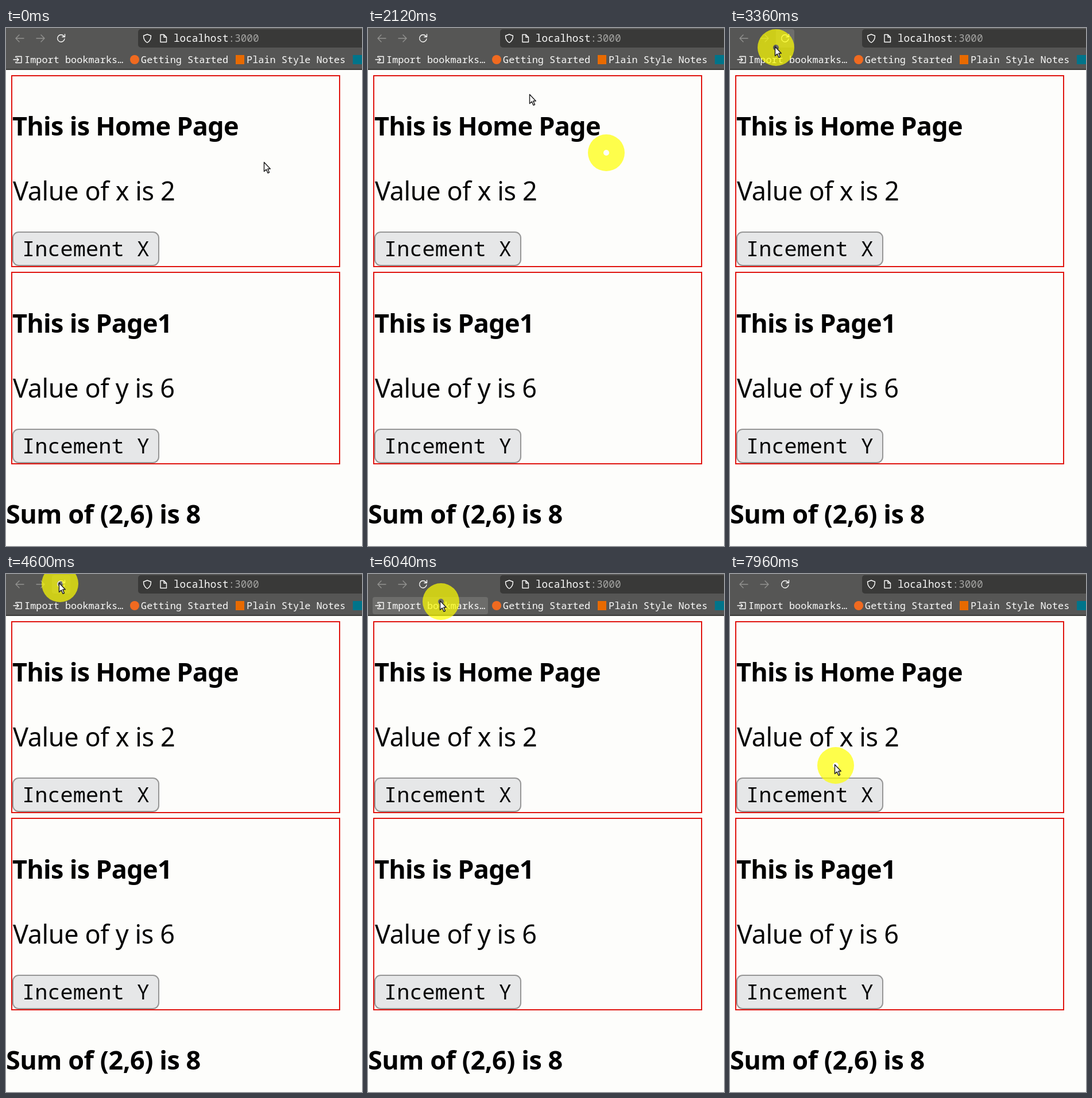
Animation, 620 px wide and 901 px high, one loop 8000 ms. Source, as an HTML page:

```html
<!DOCTYPE html>
<html lang="en">
<head>
<meta charset="utf-8">
<title>Counter page</title>
<style>
  html, body { margin: 0; width: 100%; height: 100%; overflow: hidden; background: #fdfdfb; }
  svg { display: block; width: 620px; height: 901px; }
  text { white-space: pre; }
  #page text { font: 45px "Noto Sans", "Open Sans", sans-serif; letter-spacing: -.4px; fill: #060606; }
  #page .head { font-weight: 700; letter-spacing: -.75px; fill: #000; }
  #page .sum { letter-spacing: -.5px; }
  #page .label { font: 37px "Noto Sans Mono", "DejaVu Sans Mono", monospace; letter-spacing: 0; }
  .box { fill: none; stroke: #e0140f; stroke-width: 2; }
  .button { fill: #e6e7e8; stroke: #969696; stroke-width: 2; }
  .bar { font: 500 16.9px "Noto Sans Mono", "DejaVu Sans Mono", monospace; fill: #fbfbfa; }
  .bar .url { font-size: 17.7px; }
  .icon { fill: none; stroke: #fbfbfa; stroke-width: 1.4; stroke-linejoin: round; stroke-linecap: round; }
  .dim { stroke: #929290; }
  .hover { fill: #6d6d6b; visibility: hidden; }
</style>
</head>
<body>
<svg viewBox="0 0 620 901">
  <rect width="620" height="901" fill="#fdfdfb"/>

  <g id="page">
    <rect class="box" x="10" y="83" width="571" height="332"/>
    <text class="head" x="11" y="187">This is Home Page</text>
    <text x="12" y="300">Value of x is 2</text>
    <rect class="button" x="12" y="355" width="254" height="58" rx="10"/>
    <text class="label" x="28" y="397">Incement X</text>

    <rect class="box" x="10" y="425" width="571" height="333"/>
    <text class="head" x="11" y="530">This is Page1</text>
    <text x="12" y="643">Value of y is 6</text>
    <rect class="button" x="12" y="698" width="254" height="58" rx="10"/>
    <text class="label" x="28" y="740">Incement Y</text>

    <text class="head sum" x="0" y="862">Sum of (2,6) is 8</text>
  </g>

  <g class="bar">
    <rect width="620" height="73" fill="#565655"/>
    <rect y="71" width="620" height="2" fill="#3a3a38"/>
    <rect x="230" y="2" width="400" height="32" rx="5" fill="#393938"/>
    <rect id="reloadHover" class="hover" x="80" y="2" width="32" height="32" rx="4"/>
    <rect id="importHover" class="hover" x="8" y="40" width="201" height="30" rx="4"/>

    <g class="icon">
      <path class="dim" d="M31 18H17m6-6-6 6 6 6M53 18h14m-6-6 6 6-6 6"/>
      <path d="M101 14.5A6.2 6.2 0 1 0 102 19M102.500 11v4.500H98"/>
      <path d="M246 11l6.500 2.500c0 6-2 9.500-6.500 12-4.500-2.500-6.500-6-6.500-12z"/>
      <path d="M269 11.500h6l4.500 4.500v8.500h-10.500zM275 11.500v4.500h4.500"/>
      <path d="M17 51v-1.500h10v11H17V59M13 55h9m-3-3 3 3-3 3"/>
    </g>

    <text class="url" x="292" y="24">localhost<tspan fill="#a4a4a2">:3000</tspan></text>
    <text x="32" y="61">Import bookmarks…</text>
    <circle cx="224" cy="55" r="8" fill="#f06a20"/>
    <text x="235" y="61">Getting Started</text>
    <rect x="400" y="47" width="15" height="16" fill="#e86a00"/>
    <text x="419" y="61">Plain Style Notes</text>
    <rect x="604" y="47" width="16" height="16" fill="#00748a"/>
  </g>

  <path id="halo" fill="#ff0" fill-opacity=".7" fill-rule="evenodd"
    d="M-32 0a32 32 0 1 0 64 0a32 32 0 1 0-64 0zM-5 0a5 5 0 1 0 10 0a5 5 0 1 0-10 0z"/>
  <path id="pointer" fill="#fff" stroke="#222" stroke-width="1.5" stroke-linejoin="round"
    d="M.5.5V16.500L4.300 13 7 19.300 9.500 18.200 6.800 12H11.300z"/>
</svg>

<script>
const LOOP = 8000;
const $ = id => document.getElementById(id);

// Pointer tip: time, x, y
const path = [
  [0, 449, 233], [120, 449, 233], [640, 150, 46], [1000, 300, 150],
  [2000, 413, 215], [2120, 281, 115], [2240, 250, 113], [2600, 37, 28],
  [3240, 68, 34], [3360, 78, 32], [3480, 78, 32], [3700, 74, 25],
  [4480, 92, 15], [4600, 92, 15], [4840, 93, 16], [5720, 93, 16],
  [5960, 125, 46], [6080, 127, 52], [6720, 140, 133], [7840, 176, 317],
  [7960, 182, 331], [LOOP, 182, 331]
];

function tipAt(t) {
  const i = path.findIndex((key, n) => n && t <= key[0]);
  const [t0, x0, y0] = path[i - 1], [t1, x1, y1] = path[i];
  const k = (t - t0) / (t1 - t0);
  return [x0 + (x1 - x0) * k, y0 + (y1 - y0) * k];
}

function stepTime(t) {
  const phase = t % 1120, shift = phase < 640 ? 0 : 40;
  return t - (phase - shift) % 120;
}

const place = (id, x, y) => $(id).setAttribute("transform", `translate(${x} ${y})`);
const show = (id, on) => $(id).style.visibility = on ? "visible" : "hidden";

function draw(now) {
  const t = now % LOOP, step = stepTime(t);
  const [x, y] = tipAt(step);
  const lag = step >= 2000 && step < 2360 ? 120 : 0;
  const [hx, hy] = tipAt(step - lag);
  place("pointer", x, y);
  place("halo", hx + 2, hy + 2);
  show("halo", step >= 120);
  show("page", t < 5300 || t >= 5460);
  show("reloadHover", x >= 77 && x < 112 && y < 36);
  show("importHover", x >= 8 && x < 209 && y >= 40 && y < 70);
  requestAnimationFrame(draw);
}
draw(performance.now());
</script>
</body>
</html>
```
